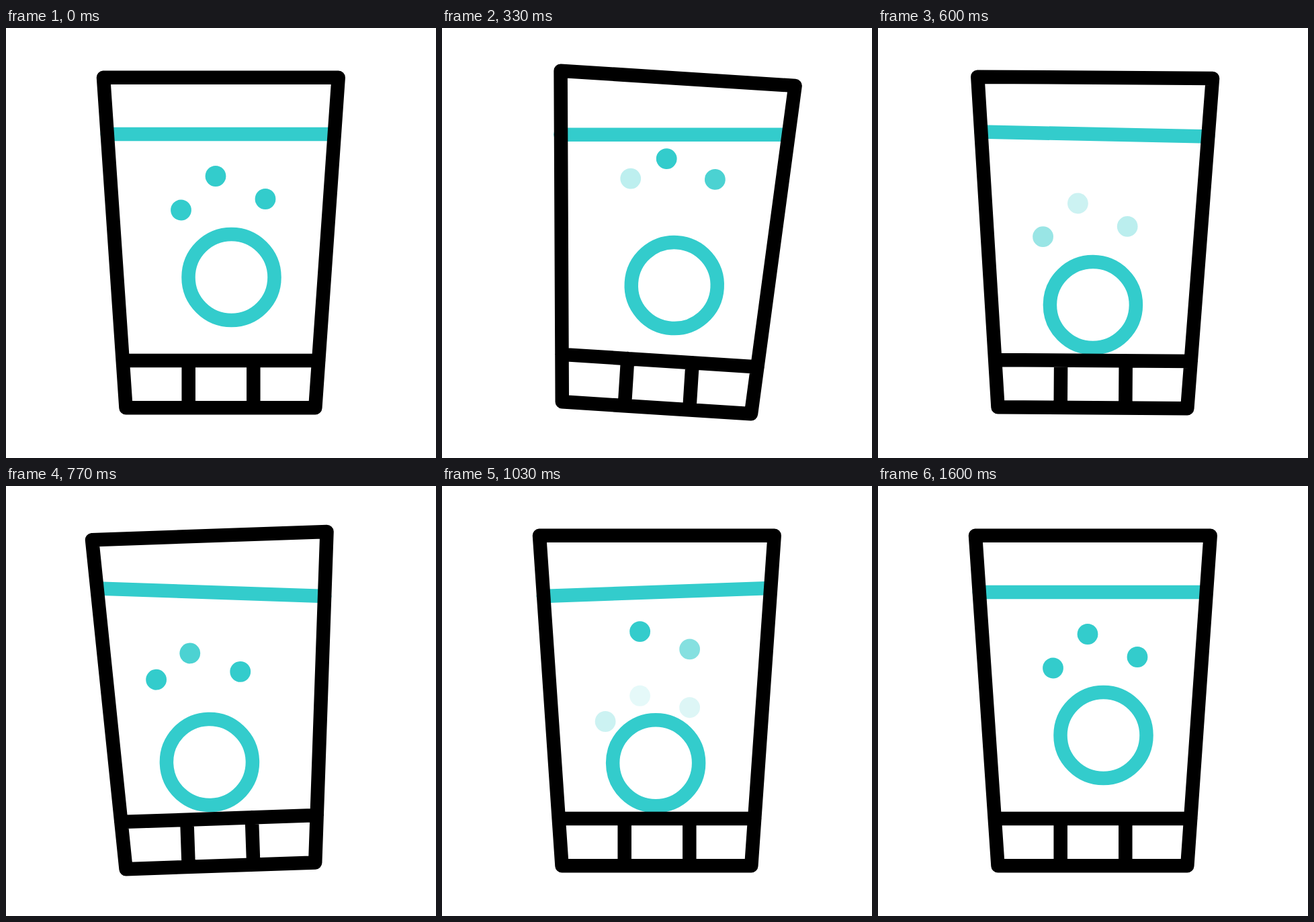
An HTML page for the animation above (1.67 s loop, 640x640 px).

```html
<!DOCTYPE html>
<html lang="en">
<head>
<meta charset="utf-8">
<title>Effervescent tablet</title>
<style>
  html, body { margin: 0; height: 100%; overflow: hidden; background: #fff; }
  svg { display: block; width: 100vw; height: 100vh; }
  .line { fill: none; stroke: #000; stroke-width: 20.5; stroke-linecap: round; stroke-linejoin: round; }
  .teal { stroke: #3cc; }
  #bubbles { fill: #3cc; }
</style>
</head>
<body>
<svg viewBox="0 0 640 640">
  <defs><path id="drift" d="M0 0C-3 26 -7 48 -27.2 39.5"/></defs>
  <path id="water" class="line teal" d="M150.6 158H488.5"/>
  <g id="glass">
    <g id="tablet">
      <g id="bubbles"></g>
      <circle class="line teal" cx="335.5" cy="371" r="64"/>
    </g>
    <path class="line" d="M145 73.8H494.7L460.3 565.3H178.5ZM173.6 495H465.4M271.7 495V565.3M368.3 495V565.3"/>
  </g>
</svg>
<script>
const LOOP = 1670;
const PIVOT = { x: 319.6, y: 565.3 };
const WATER_Y = 158;
const $ = id => document.getElementById(id);
const clamp = v => Math.min(1, Math.max(0, v));

// Eased value between [frame, value] keys.
function track(keys, f) {
  let value = keys[0][1];
  for (let i = 1; i < keys.length; i++) {
    const [f0, v0] = keys[i - 1], [f1, v1] = keys[i];
    if (f < f0) break;
    const x = clamp((f - f0) / (f1 - f0));
    value = v0 + (v1 - v0) * x * x * (3 - 2 * x);
  }
  return value;
}

const glassTilt = [[2, 0], [11.8, 4], [22.7, -2], [31, 0]];
const waterTilt = [[12, 0], [22.7, 2], [31, -2], [38.5, 0]];
const sink = [[5, 0], [23, 1], [27, 1], [42, 0]];

const RISE = 57.5, FADE_OUT = 5;
const bubbles = [];

function addBubble(x, keys, fadeFrom, fadeLength, end) {
  const el = document.createElementNS('http://www.w3.org/2000/svg', 'circle');
  el.setAttribute('cx', x);
  el.setAttribute('r', 15.4);
  $('bubbles').append(el);
  bubbles.push({ el, keys, fadeFrom, fadeLength, end });
}

// Three generations per bubble: leaving, passing through, and arriving.
[
  { x: 260.5, low: 311, mid: 271, fade: 4, leave: 11.6, pass: 30, arrive: 38 },
  { x: 312, low: 271.5, mid: 220.5, fade: 8, leave: 16.8, pass: 37, arrive: 48 },
  { x: 386, low: 289, mid: 254.5, fade: 6, leave: 14.4, pass: 34, arrive: 44 }
].forEach(({ x, low, mid, fade, leave, pass, arrive }) => {
  addBubble(x, [[0, mid], [leave, mid - RISE]], -fade, fade, leave);
  addBubble(x, [[17, mid], [pass, mid - RISE]], 16, fade, pass);
  addBubble(x, [[30, low], [arrive, mid]], 30, fade, Infinity);
});

const drift = $('drift'), driftLength = drift.getTotalLength();

function draw(f) {
  const tilt = track(glassTilt, f), angle = tilt * Math.PI / 180;
  $('glass').setAttribute('transform', `rotate(${tilt} ${PIVOT.x} ${PIVOT.y})`);

  const arm = PIVOT.y - WATER_Y;
  const dx = arm * Math.sin(angle), dy = arm * (1 - Math.cos(angle));
  $('water').setAttribute('transform',
    `translate(${dx} ${dy}) rotate(${track(waterTilt, f)} ${PIVOT.x} ${WATER_Y})`);

  const p = drift.getPointAtLength(driftLength * track(sink, f));
  $('tablet').setAttribute('transform', `translate(${p.x} ${p.y})`);

  for (const b of bubbles) {
    b.el.setAttribute('cy', track(b.keys, f));
    b.el.setAttribute('opacity',
      clamp((f - b.fadeFrom) / b.fadeLength) * clamp((b.end - f) / FADE_OUT));
  }
}

// Thirty steps a second, each starting on a 10 ms tick.
function tick() {
  const t = performance.now() % LOOP;
  draw(Math.floor((Math.floor(t / 10) + 0.5) * 0.3));
  requestAnimationFrame(tick);
}
tick();
</script>
</body>
</html>
```
